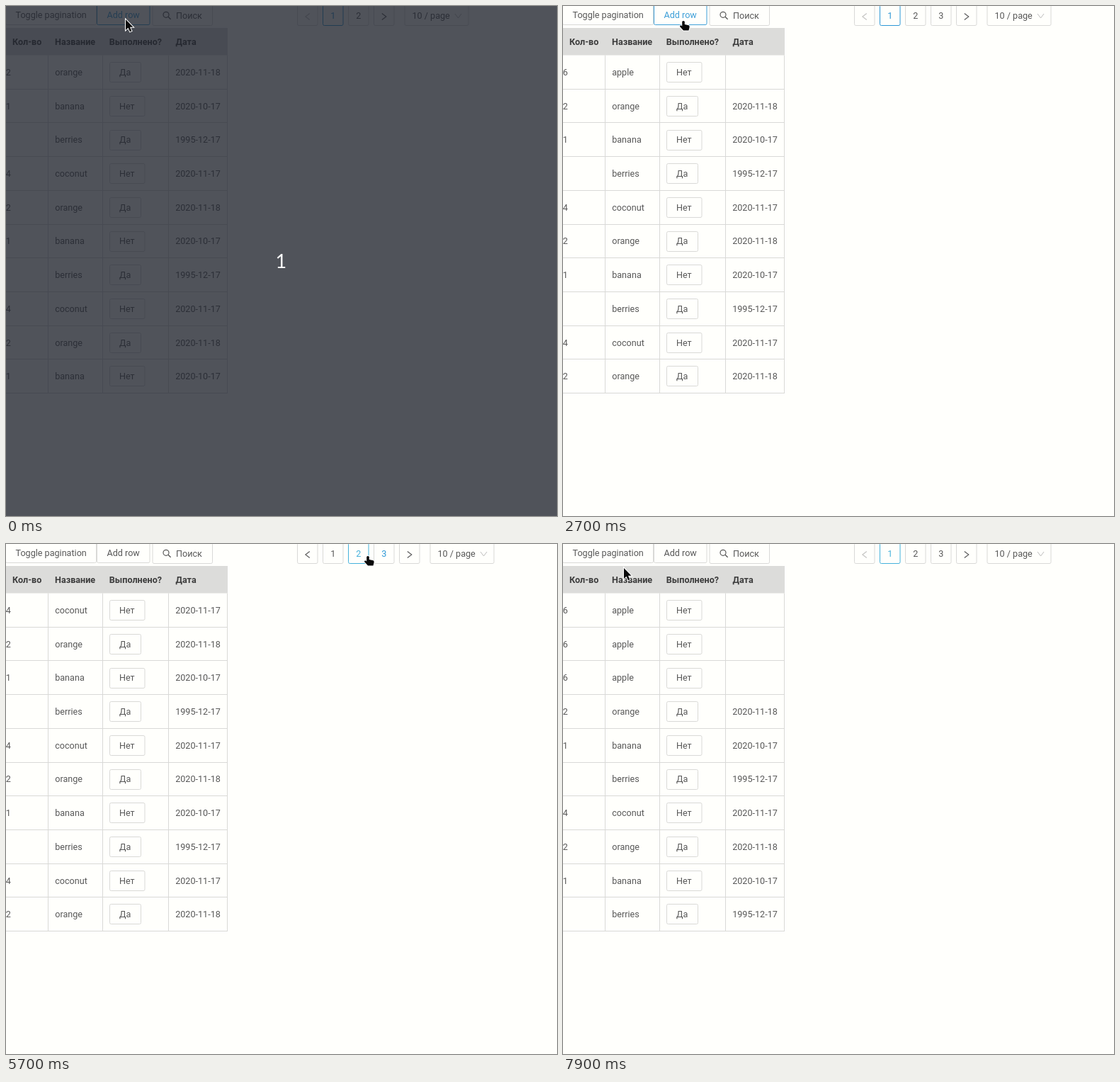
An HTML page with a canvas for the animation above (8000 ms loop, 778x720 px).

```html
<!DOCTYPE html>
<html lang="ru">
<head>
<meta charset="utf-8">
<title>Table demo</title>
<style>
  html, body { margin: 0; width: 778px; height: 720px; overflow: hidden; background: #fffffc; }
  canvas { display: block; }
</style>
</head>
<body>
<canvas id="stage" width="778" height="720"></canvas>
<script>
const ctx = document.getElementById('stage').getContext('2d');
const LOOP = 8000, ROW = 47.7, TOP = 69.5;
const INK = '#585858', LINE = '#d9d9d7', OFF = '#c3c3c1';
const BLUE = '#2c97d6', LIGHT = '#45b2dc';

const fruits = [
  ['2', 'orange', 'Да', '2020-11-18'],
  ['1', 'banana', 'Нет', '2020-10-17'],
  ['', 'berries', 'Да', '1995-12-17'],
  ['4', 'coconut', 'Нет', '2020-11-17'],
];
const apple = ['6', 'apple', 'Нет', ''];
const base = Array.from({ length: 20 }, (_, i) => fruits[i % 4]);

const addTimes = [800, 2800, 4500];
const pageTimes = [[0, 1], [5400, 2], [6000, 3], [7500, 2], [7700, 1]];

// time, x, y of the pointer
const path = [
  [0, 169, 19], [400, 169, 19], [500, 170, 20], [700, 170, 20], [800, 170, 21],
  [3100, 170, 21], [3400, 502, 30], [3700, 216, 40], [3800, 216, 40],
  [4200, 147, 14], [4600, 147, 14], [5200, 504, 17], [5600, 504, 17],
  [5700, 511, 17], [5900, 535, 18], [6200, 535, 15], [6400, 560, 14],
  [6500, 560, 14], [6700, 584, 18], [6900, 510, 28], [7100, 440, 23],
  [7300, 422, 20], [7700, 422, 20], [7900, 86, 34],
];

const arrow = new Path2D('M0 0V15L3.5 11.8L6 17.2L8.4 16.2L6 10.8H10.5Z');
const hand = new Path2D('M-1.8 1Q0 -1 1.8 1V5L7.5 6.3Q9 7 8.6 9L7.5 13.5H0L-5 8Q-5.2 6 -3 6.6L-1.8 7.6Z');

function pointerAt(t) {
  const i = path.findIndex(p => p[0] >= t);
  if (i < 0) return path[path.length - 1].slice(1);
  if (i === 0) return path[0].slice(1);
  const [t0, x0, y0] = path[i - 1], [t1, x1, y1] = path[i];
  const k = (t - t0) / (t1 - t0);
  return [x0 + (x1 - x0) * k, y0 + (y1 - y0) * k];
}

function text(s, x, y, color = INK, font = '12.6px Roboto, sans-serif') {
  ctx.font = font;
  ctx.fillStyle = color;
  ctx.fillText(s, x, y);
}

function box(x, y, w, h, color = LINE) {
  ctx.strokeStyle = color;
  ctx.lineWidth = 1;
  ctx.beginPath();
  ctx.roundRect(x, y, w, h, 2);
  ctx.stroke();
}

function lines(color, width, ...points) {
  ctx.strokeStyle = color;
  ctx.lineWidth = width;
  ctx.beginPath();
  points.forEach(([x, y], i) => i ? ctx.lineTo(x, y) : ctx.moveTo(x, y));
  ctx.stroke();
}

function drawToolbar(t) {
  const focused = t < 5400;
  box(-.5, -2, 128, 28.5);
  text('Toggle pagination', 13.5, 17);
  box(128.5, -2, 74.5, 28.5, focused ? '#3d9fd8' : LINE);
  text('Add row', 142.5, 17, focused ? '#3d9fd8' : INK);
  box(207, -1.5, 84.5, 29);
  ctx.beginPath();
  ctx.strokeStyle = INK;
  ctx.lineWidth = 1.2;
  ctx.arc(226, 12.3, 4, 0, 7);
  ctx.stroke();
  lines(INK, 1.4, [229, 15.2], [232.6, 18.8]);
  text('Поиск', 240, 18);
}

function drawPager(t, page, pages) {
  const [px, py] = pointerAt(t), [nx, ny] = pointerAt(t + 100);
  const over = (x, mx, my) => t >= 500 && my < 27 && mx >= x - .5 && mx <= x + 29.5;
  const active = t < 5400 ? BLUE : LIGHT;

  for (let i = 0; i <= pages + 1; i++) {
    const x = 411.5 + 36 * i;
    const isArrow = i === 0 || i > pages;
    const enabled = i === 0 ? page > 1 : i <= pages || page < pages;
    const current = i === page;
    const border = current ? active : enabled && over(x, px, py) ? BLUE : LINE;
    const ink = current ? active : !enabled ? OFF : over(x, nx, ny) ? BLUE : INK;
    box(x, -1.5, 28.5, 29, border);
    if (isArrow) {
      const d = i ? 3 : -3, c = x + 14.3;
      lines(ink, 1.1, [c - d, 10.5], [c + d, 15], [c - d, 19.5]);
    } else {
      text(i, x + 10.8, 18, ink);
    }
  }

  const x = 411.5 + 36 * (pages + 2) + 7.5;
  box(x, -1.5, 90, 29);
  text('10 / page', x + 10.5, 18);
  lines('#bdbdbb', 1, [x + 71, 11], [x + 75.5, 17], [x + 80, 11]);
}

function drawTable(rows) {
  ctx.fillStyle = '#dcdcda';
  ctx.fillRect(0, 31, 313, 38.5);
  const heads = [['Кол-во', 9], ['Название', 69], ['Выполнено?', 145.8], ['Дата', 239.5]];
  for (const [s, x] of heads) text(s, x, 55, '#3c3c3c', 'bold 12.6px Roboto, sans-serif');

  rows.forEach(([count, name, done, date], i) => {
    const y = TOP + ROW * i, baseline = Math.round(y + 28.4);
    const bottom = Math.floor(y + ROW) + .5;
    lines(LINE, 1, [0, bottom], [313, bottom]);
    text(count, -.2, baseline);
    text(name, 69.2, baseline);
    box(146.5, Math.round(y + 9.6) + .5, done === 'Да' ? 44 : 49.5, 28);
    text(done, 160, baseline);
    text(date, 239.2, baseline);
  });

  const end = TOP + ROW * rows.length;
  for (const x of [59.5, 136.5, 229.5, 312.5]) lines(LINE, 1, [x, TOP], [x, end]);
}

function drawPointer(t) {
  const [x, y] = pointerAt(t);
  const clickable = [[128, 203], [411, 439], [447, 548]];
  const pointing = t >= 500 && y < 27 && clickable.some(([a, b]) => x >= a && x <= b);
  const shape = pointing ? hand : arrow;
  ctx.save();
  ctx.translate(x, y);
  ctx.strokeStyle = '#fff';
  ctx.lineWidth = 2;
  ctx.stroke(shape);
  ctx.fillStyle = '#0a0a0a';
  ctx.fill(shape);
  ctx.restore();
}

function draw(now) {
  const t = Math.floor(now % LOOP / 100) * 100;
  const apples = addTimes.filter(a => t >= a).length;
  const page = pageTimes.filter(p => t >= p[0]).pop()[1];
  const data = [...Array(apples).fill(apple), ...base];

  ctx.fillStyle = '#fffffc';
  ctx.fillRect(0, 0, 778, 720);
  drawToolbar(t);
  drawPager(t, page, Math.ceil(data.length / 10));
  drawTable(data.slice(page * 10 - 10, page * 10));

  if (t < 500) {
    ctx.fillStyle = 'rgba(31,35,45,.78)';
    ctx.fillRect(0, 0, 778, 720);
    text('1', 380.5, 370, '#fff', '27px Lato, sans-serif');
  }
  drawPointer(t);
}

const start = performance.now();
function tick() {
  draw(performance.now() - start);
  requestAnimationFrame(tick);
}
tick();
</script>
</body>
</html>
```
